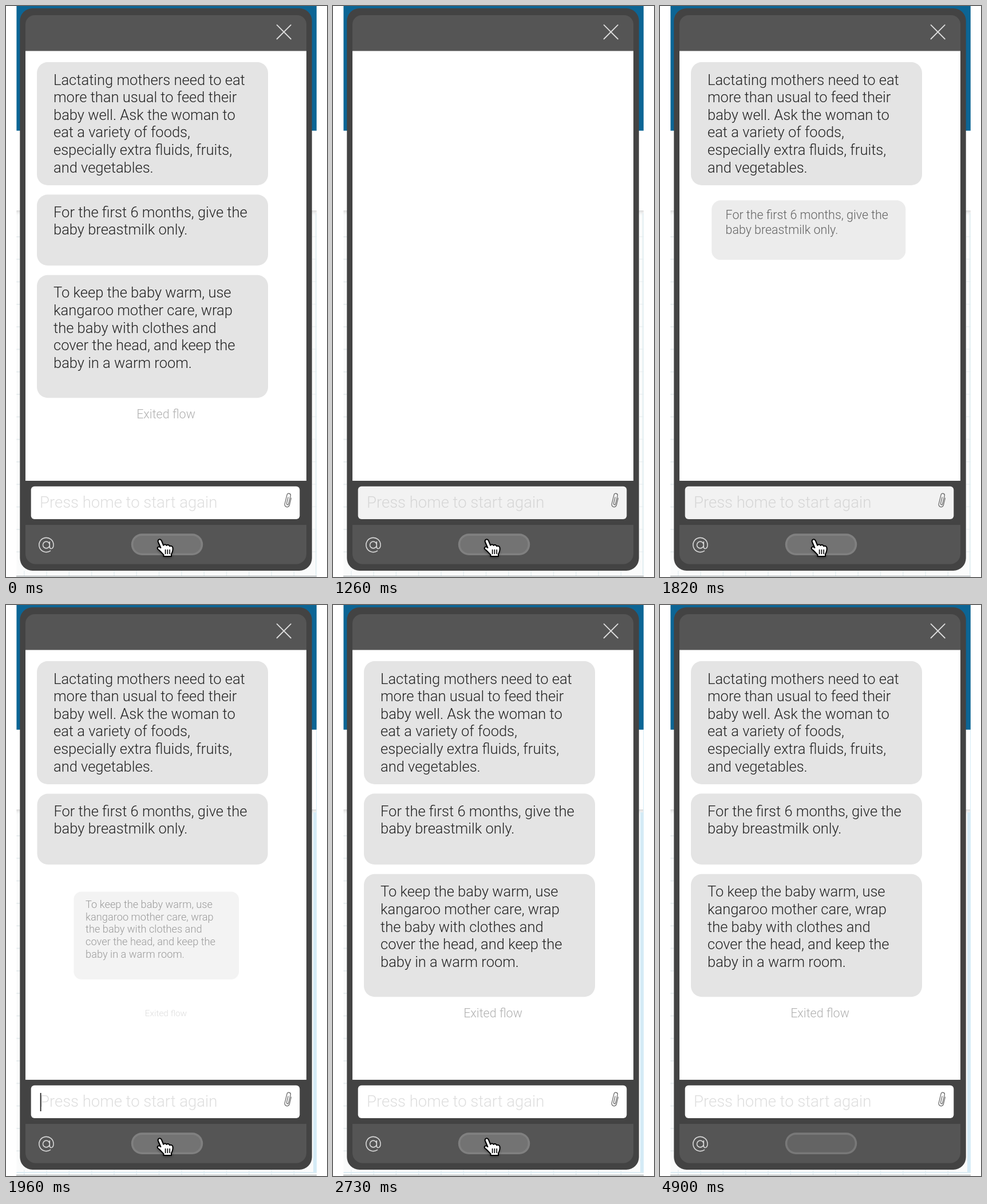
An HTML page with a canvas that plays this animation: 561x997 px, repeating every 6.02 s.

```html
<!DOCTYPE html>
<html lang="en">
<head>
<meta charset="utf-8">
<title>Chat flow</title>
<style>
  html, body { margin: 0; width: 100%; height: 100%; overflow: hidden; background: #fff; }
  canvas { display: block; width: 561px; height: 997px; }
</style>
</head>
<body>
<canvas id="stage"></canvas>
<script>
const W = 561, H = 997, LOOP = 6020, STEP = 70;
const FONT = 'Roboto, "Open Sans", sans-serif';
const LINE = 30.6;
const CLEAR = 1120, READY = 1960, LEAVE = 3360, BLUR = 4620;
const BLINK = 1050, CARET_ON = 560;

const bubbles = [
  { y: 98, h: 215, start: 1380, lines: [
    'Lactating mothers need to eat', 'more than usual to feed their',
    'baby well. Ask the woman to', 'eat a variety of foods,',
    'especially extra fluids, fruits,', 'and vegetables.'] },
  { y: 329.3, h: 124, start: 1735, lines: [
    'For the first 6 months, give the', 'baby breastmilk only.'] },
  { y: 469.8, h: 214.5, start: 1914, lines: [
    'To keep the baby warm, use', 'kangaroo mother care, wrap',
    'the baby with clothes and', 'cover the head, and keep the',
    'baby in a warm room.'] }
];

const canvas = document.getElementById('stage');
const ctx = canvas.getContext('2d');
const dpr = window.devicePixelRatio || 1;
canvas.width = W * dpr;
canvas.height = H * dpr;

const clamp = v => Math.max(0, Math.min(1, v));
const easeOut = v => 1 - (1 - v) ** 3;

function rect(x, y, w, h, color) {
  ctx.fillStyle = color;
  ctx.fillRect(x, y, w, h);
}

function box(x, y, w, h, r, color) {
  ctx.beginPath();
  ctx.roundRect(x, y, w, h, r);
  ctx.fillStyle = color;
  ctx.fill();
}

function text(str, x, y, size, color, align = 'left') {
  ctx.font = `300 ${size}px ${FONT}`;
  ctx.textAlign = align;
  ctx.fillStyle = color;
  ctx.fillText(str, x, y);
}

function stroke(path, color, width) {
  ctx.strokeStyle = color;
  ctx.lineWidth = width;
  ctx.stroke(new Path2D(path));
}

function drawPage(t) {
  const tinted = t >= READY;
  rect(0, 0, W, H, '#fff');
  rect(18.4, 0, 524.4, 217.7, '#0c6595');
  rect(18.4, 358, 524.4, 638, '#fafbfb');
  for (let y = 402; y < 985; y += 39.3) {
    rect(18.4, y, 5.6, 2, '#e6ebed');
    if (!tinted) rect(535, y, 8, 1.5, '#edf1f2');
  }
  for (let x = 31; x < 540; x += 39.3) rect(x, 986, 1.5, 9, '#e6eef0');
  const shade = ctx.createLinearGradient(0, 357, 0, 366);
  shade.addColorStop(0, '#d9d9d9');
  shade.addColorStop(1, 'rgba(240,240,240,0)');
  rect(18.4, 357, 524.4, 9, shade);
  if (tinted) {
    rect(537, 362, 6, 630, '#d5ebf6');
    rect(542, 218, 1, 144, '#d5ebf6');
    rect(18.4, 990, 524.4, 2, '#dcecf3');
  } else {
    rect(541, 362, 1.5, 632, '#dcebf0');
  }
  rect(18, 995, 525, 1, '#8b9396');
}

function drawPhone() {
  box(24.3, 4, 510.4, 982, 22, '#434343');
  box(34, 16, 491, 62.5, [16, 16, 0, 0], '#555');
  rect(34, 78.5, 491, 750.5, '#fff');
  box(34, 906, 491, 68.5, [0, 0, 18, 18], '#555');
  stroke('M473.5 33.2L497.8 57.5M497.8 33.2L473.5 57.5', '#dedede', 1.8);
}

// Runs draw() scaled around a centre line and faded.
function pop(cy, scale, alpha, draw) {
  const cx = 279.5;
  ctx.save();
  ctx.globalAlpha = alpha;
  ctx.translate(cx, cy);
  ctx.scale(scale, scale);
  ctx.translate(-cx, -cy);
  draw();
  ctx.restore();
}

function drawChat(t) {
  const leaving = t < 1260;
  let scale = 1, alpha = 1;
  for (const b of bubbles) {
    const p = easeOut(clamp((t - b.start) / 270));
    scale = leaving ? 1 : 0.5 + 0.5 * p;
    alpha = leaving ? 1 - clamp((t - CLEAR + STEP) / 210) : p;
    if (!alpha) continue;
    pop(b.y + b.h / 2, scale, alpha, () => {
      box(54, b.y, 404, b.h, 19, '#e4e4e4');
      b.lines.forEach((s, i) => text(s, 83, b.y + 39.5 + i * LINE, 25.5, '#222'));
    });
  }
  if (alpha) pop(712, scale, alpha, () => text('Exited flow', 279.5, 720, 21.5, '#b0b0b0', 'center'));
}

function drawInput(t) {
  const busy = t >= CLEAR && t < READY;
  box(43.7, 838.7, 469.6, 57.2, 6, busy ? '#f2f2f2' : '#fff');
  text('Press home to start again', 59, 876, 27.5, busy ? '#d6d6d6' : '#dedede');
  const caret = t >= READY && t < BLUR && (t - READY) % BLINK < CARET_ON;
  if (caret) rect(59.7, 852, 1.8, 32, '#222');

  ctx.save();
  ctx.translate(493.3, 863);
  ctx.rotate(0.24);
  stroke('M4 -5V7.8A4.2 4.2 0 0 1 -4.4 7.8V-8.6A3.2 3.2 0 0 1 2 -8.6V6.2A1.7 1.7 0 0 1 -1.4 6.2V-5', '#6e6e6e', 1.3);
  ctx.restore();
}

function drawBar(hover) {
  stroke('M76.3 935.5V944C76.3 950 83 948 83 941A12.6 12.6 0 1 0 77.5 951.4' +
    'M76.3 941A5.9 5.9 0 1 1 64.5 941A5.9 5.9 0 1 1 76.3 941', '#d8d8d8', 1.6);
  box(218.8, 921.3, 125.4, 37.7, 18.8, hover ? '#808080' : '#787878');
  box(222.4, 924.9, 118.2, 30.5, 15.2, hover ? '#737373' : '#646464');
}

const hand = new Path2D('M265.8 935.5C264.8 931 270 929.6 271.7 933.4L275.2 941.8' +
  'C276.2 939.6 279.8 939.6 280.6 942C282.2 940 285.2 940.8 286 943.2' +
  'C288.2 942 291.2 943.3 291.5 946C292.2 951 290.6 954 289 957V961H275.5V958.3' +
  'C272.5 955.3 269.5 951.5 266 949C263 946.6 265.6 943.2 269 944.8L270.4 946Z');

function drawHand(dy) {
  ctx.save();
  ctx.beginPath();
  ctx.rect(0, 0, W, 996);
  ctx.clip();
  ctx.translate(0, dy);
  ctx.save();
  ctx.shadowColor = 'rgba(0,0,0,.45)';
  ctx.shadowBlur = 4 * dpr;
  ctx.shadowOffsetY = 2 * dpr;
  ctx.fillStyle = '#fff';
  ctx.fill(hand);
  ctx.restore();
  ctx.strokeStyle = '#000';
  ctx.lineWidth = 2;
  ctx.stroke(hand);
  stroke('M278.6 949.5V956.5M282.4 949.5V956.5M286.2 949.5V956.5', '#000', 1.6);
  ctx.restore();
}

function draw(now) {
  const t = Math.floor((now % LOOP) / STEP) * STEP;
  const dy = 68 * clamp((t - LEAVE + STEP) / 280) ** 2;
  ctx.setTransform(dpr, 0, 0, dpr, 0, 0);
  ctx.lineCap = ctx.lineJoin = 'round';
  drawPage(t);
  drawPhone();
  drawChat(t);
  drawInput(t);
  drawBar(dy < 27);
  if (dy < 68) drawHand(dy);
}

let begin;
function tick(now) {
  begin ??= now;
  draw(now - begin);
  requestAnimationFrame(tick);
}
draw(0);
requestAnimationFrame(tick);
</script>
</body>
</html>
```
